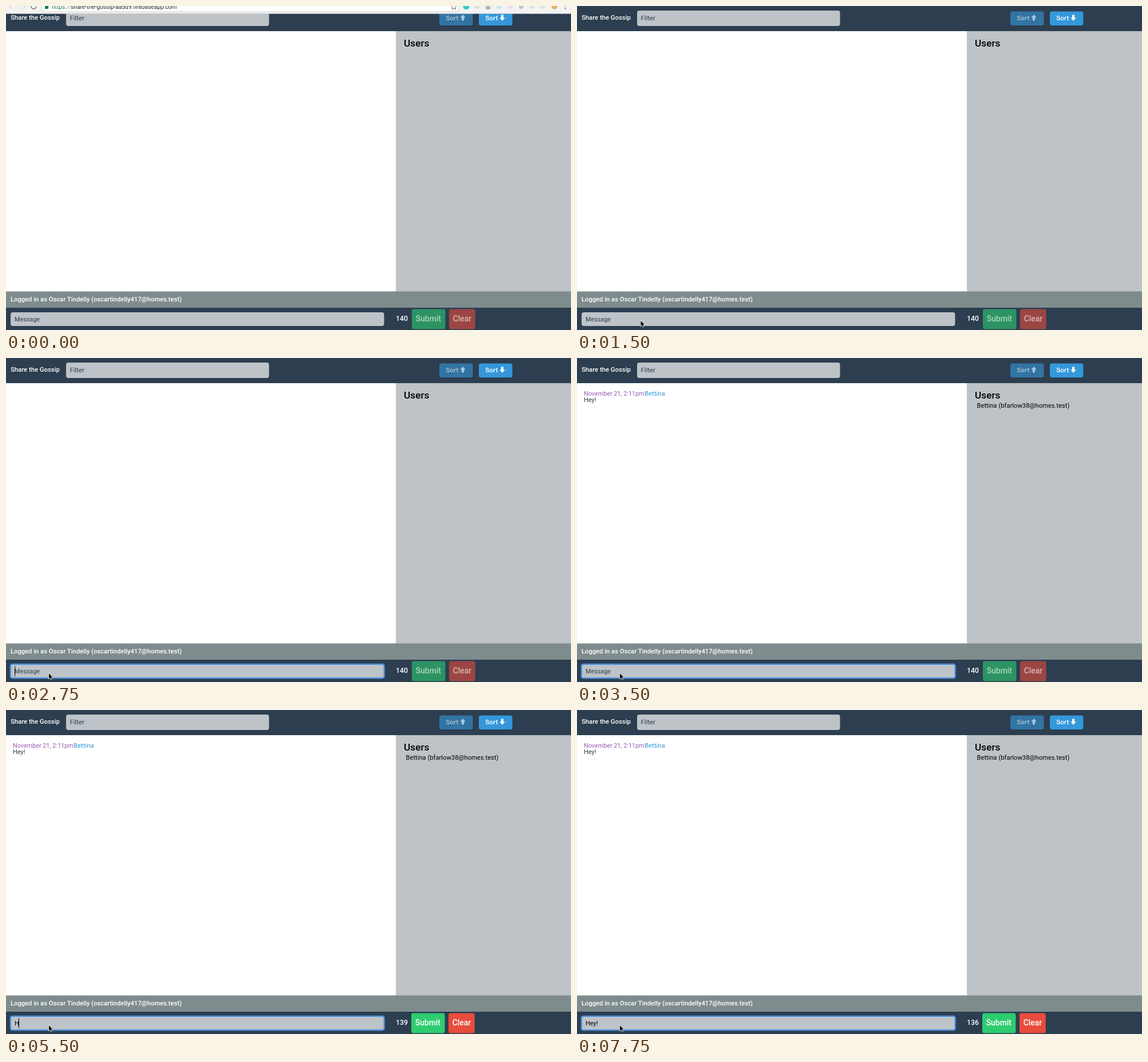
Animation, 987 px wide and 567 px high, one loop 8000 ms. Source, as an HTML page with a canvas:

```html
<!DOCTYPE html>
<html lang="en">
<head>
<meta charset="utf-8">
<title>Chat room</title>
<style>
html, body { margin: 0; width: 100%; height: 100%; overflow: hidden; background: #fff; }
canvas { display: block; width: 987px; height: 567px; }
</style>
</head>
<body>
<canvas id="stage" width="987" height="567"></canvas>
<script>
const ctx = document.getElementById('stage').getContext('2d');
const LOOP = 8000;
const NAVY = '#2c3e50', SILVER = '#bdc3c7', BLUE = '#3498db';

// Each track lists [start time, value]; a value holds until the next one.
const pointer = [[0, null], [750, [279, 411.5]], [1000, [206.5, 494]], [1250, [121.5, 544.5]],
  [1500, [111.5, 551]], [2250, [78.5, 548.5]], [2500, [75, 552]]];
const typed = [[0, ''], [5500, 'H'], [5750, 'Hey'], [7250, 'Hey!']];
const caret = [[0, false], [2750, true], [3250, false], [3750, true], [4250, false], [4750, true],
  [5250, false], [5500, true], [6250, false], [6750, true], [7750, false]];

function at(track, t) {
  let value = track[0][1];
  for (const [start, v] of track) if (t >= start) value = v;
  return value;
}

function rect(x, y, w, h, color) {
  ctx.fillStyle = color;
  ctx.fillRect(x, y, w, h);
}

function box(x, y, w, h, r, color) {
  ctx.fillStyle = color;
  ctx.beginPath();
  ctx.roundRect(x, y, w, h, r);
  ctx.fill();
}

function disc(x, y, r, color) {
  ctx.fillStyle = color;
  ctx.beginPath();
  ctx.arc(x, y, r, 0, 7);
  ctx.fill();
}

function text(str, x, y, size, color, weight = 400) {
  ctx.font = `${weight} ${size}px Roboto, "Open Sans", sans-serif`;
  ctx.fillStyle = color;
  ctx.fillText(str, x, y);
  return x + ctx.measureText(str).width;
}

function line(points, color, width = 1) {
  ctx.strokeStyle = color;
  ctx.lineWidth = width;
  ctx.beginPath();
  for (const [x, y] of points) ctx.lineTo(x, y);
  ctx.stroke();
}

function button(x, y, w, h, color, label, tx, ty, size, enabled) {
  ctx.globalAlpha = enabled ? 1 : 0.6;
  box(x, y, w, h, 3.5, color);
  text(label, x + tx, y + ty, size, '#fff', 500);
  ctx.globalAlpha = 1;
}

function arrow(x, y, dir, alpha) {
  ctx.save();
  ctx.translate(x, y);
  ctx.scale(1, dir);
  ctx.globalAlpha = alpha;
  ctx.fillStyle = '#fff';
  ctx.beginPath();
  for (const [px, py] of [[0, -5.5], [4.8, 0], [2, 0], [2, 5], [-2, 5], [-2, 0], [-4.8, 0]]) ctx.lineTo(px, py);
  ctx.fill();
  ctx.restore();
}

function drawHeader() {
  rect(0, 0, 987, 44, NAVY);
  text('Share the Gossip', 8, 24, 11.3, '#fff', 500);
  box(105, 8, 354.5, 27, 4, SILVER);
  text('Filter', 111.5, 25, 11.4, NAVY);
  button(757, 9.5, 58.5, 24.5, BLUE, 'Sort', 11.3, 15, 11.7, false);
  button(826, 9.5, 58.5, 24.5, BLUE, 'Sort', 11.3, 15, 11.7, true);
  arrow(798, 20.5, 1, 0.6);
  arrow(867, 20.5, -1, 1);
}

function drawBrowserBar() {
  rect(0, 0, 987, 13.5, '#f3f3f3');
  rect(0, 12.8, 987, 0.8, '#c4c4c4');
  box(61.5, -12, 730, 22.5, 3, '#d0d0d0');
  box(62.5, -11, 728, 20.5, 2.5, '#fff');
  line([[10, -2], [7, 1], [10.5, 4.5]], '#d2d2d2', 1.2);
  line([[29, -2], [33, 1], [29, 4.5]], '#d2d2d2', 1.2);
  ctx.strokeStyle = '#666';
  ctx.lineWidth = 1.3;
  ctx.beginPath();
  ctx.arc(48.5, 0.5, 4.6, 0.1, 3.3);
  ctx.stroke();
  rect(68, -1, 6, 6, '#0b8043');
  let x = text('https', 80, 5, 10.2, '#0b8043');
  x = text('://', x, 5, 10.2, '#6a9a7c');
  text('share-the-gossip-aa5d9.firebaseapp.com', x, 5, 10.2, '#222');
  line([[778, 0], [780, 2], [779.5, 6], [782.5, 4], [785.5, 6], [785, 2], [787, 0]], '#666');
  disc(804, 0.5, 5.6, '#30cdc9');
  for (const i of [823, 881, 919, 938]) disc(i, 0.5, 4.6, '#e0e0e0');
  rect(838, -1, 8, 7, '#b4b4b4');
  disc(861.5, 0.5, 4.8, '#bfe8f2');
  disc(900, 1, 4, '#c2c2c2');
  disc(958, 0.5, 5.2, '#e5b565');
  disc(977, 0, 1.1, '#555');
  disc(977, 4.3, 1.1, '#555');
}

function drawFooter(t) {
  const value = at(typed, t);
  rect(0, 499.5, 987, 28.5, '#7f8c8d');
  text('Logged in as Oscar Tindelly (oscartindelly417@homes.test)', 8, 517, 11.2, '#fff', 500);
  rect(0, 528, 987, 39, NAVY);

  if (t >= 2750) {
    box(6.3, 534.3, 655.9, 27.4, 5, 'rgba(77,148,230,.55)');
    box(7.2, 535.2, 654.1, 25.6, 4, '#4d94e6');
    box(9, 537, 650.5, 22, 2, SILVER);
  } else {
    box(8, 536, 652.5, 24, 4, SILVER);
  }
  const end = text(value, 15, 551.5, 11, '#000');
  if (!value) text('Message', 15, 551.5, 10.8, NAVY);
  if (at(caret, t)) rect(Math.floor(end), 539, 1, 18, '#111');

  const x = [709, 708, 707, 707, 708][value.length];
  const ready = value !== '';
  text(String(140 - value.length), 681, 551, 12.3, '#fff', 500);
  button(x, 530.5, 58.5, 35, '#2ecc71', 'Submit', 6.7, 21.5, 13.9, ready);
  button(x + 65, 530.5, 45.7, 35, '#e74c3c', 'Clear', 6.7, 21.5, 13.9, ready);
}

function drawPointer([x, y]) {
  ctx.save();
  ctx.translate(x, y);
  ctx.beginPath();
  for (const [px, py] of [[0, 0], [0, 9], [2, 7.2], [3.5, 10.6], [5, 9.9], [3.6, 6.6], [6.3, 6.5]]) ctx.lineTo(px, py);
  ctx.closePath();
  ctx.shadowColor = 'rgba(0,0,0,.35)';
  ctx.shadowBlur = 2;
  ctx.shadowOffsetY = 1;
  ctx.strokeStyle = '#fff';
  ctx.lineWidth = 1.4;
  ctx.stroke();
  ctx.shadowColor = 'transparent';
  ctx.fillStyle = '#000';
  ctx.fill();
  ctx.restore();
}

function draw(t) {
  rect(0, 0, 987, 567, '#fff');
  rect(681, 44, 306, 456, SILVER);
  text('Users', 695, 71, 17.3, '#000', 500);
  drawHeader();
  if (t < 750) drawBrowserBar();
  if (t >= 3500) {
    text('November 21, 2:11pm', 12, 66, 10.8, '#9b59b6');
    text('Bettina', 118, 66, 11.3, BLUE);
    text('Hey!', 12, 77, 11, NAVY);
    text('Bettina (bfarlow38@homes.test)', 698.5, 87, 11.2, '#000');
  }
  drawFooter(t);
  const tip = at(pointer, t);
  if (tip) drawPointer(tip);
}

const start = performance.now();
function tick() {
  draw((performance.now() - start) % LOOP);
  requestAnimationFrame(tick);
}
tick();
</script>
</body>
</html>
```
